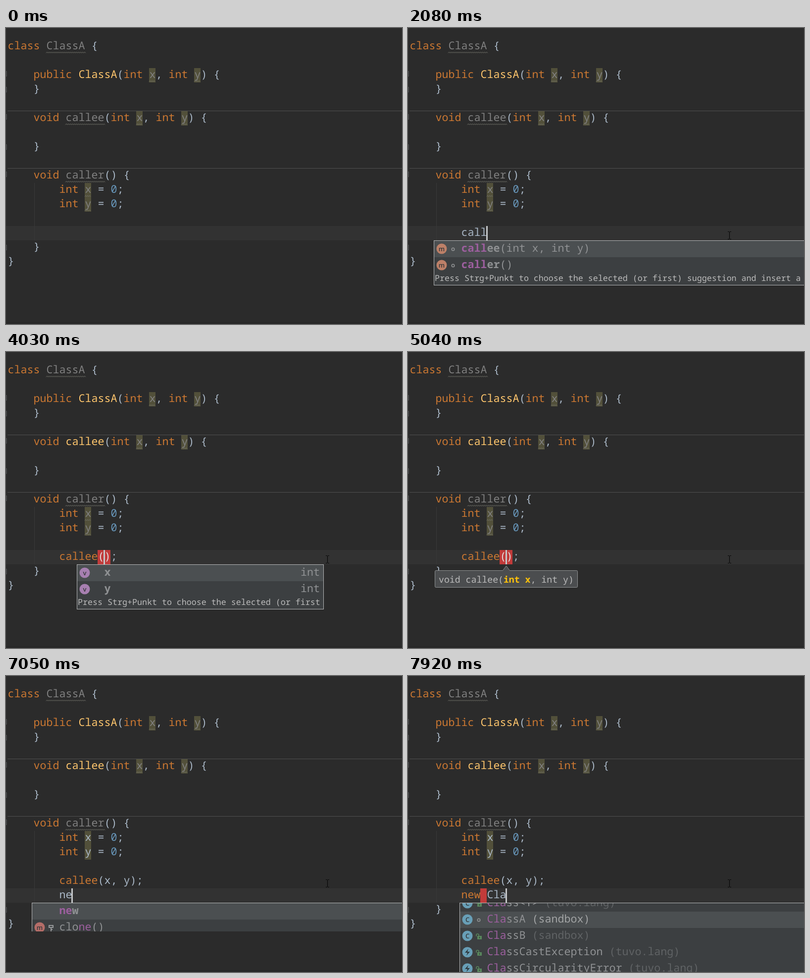
Recreate the animation shown at these times as an HTML page. Size 800 by 598 pixels, loop 8000 ms.

```html
<!DOCTYPE html>
<html lang="en">
<head>
<meta charset="utf-8">
<title>Code completion</title>
<style>
  html, body { margin: 0; width: 100%; height: 100%; overflow: hidden; background: #2b2b2b; }
  svg { display: block; }
  text {
    font-family: "Noto Sans Mono", "DejaVu Sans Mono", monospace;
    font-size: 21.667px;
    white-space: pre;
    text-rendering: geometricPrecision;
  }
  .icon { font: 600 13px "Open Sans", sans-serif; text-anchor: middle; }
</style>
</head>
<body>
<svg id="stage" width="800" height="598" viewBox="0 0 800 598"></svg>
<script>
const LOOP = 8000, CHAR = 13, ROW = 29, LEFT = 3, TOP = 23;
const RED = '#c13b3a', MATCH = '#3b514d', UNUSED = '#52503a';

// Style codes that prefix each run of text
const STYLES = {
  k: ['#cc7832'], t: ['#a9b7c6'], g: ['#808080'], f: ['#ffc66d'], n: ['#6897bb'],
  w: ['#e6dcdc'], m: ['#ffef28', 'bold'],
  P: ['#9d5f9f', 'bold'], B: ['#8f9193', 'bold'], p: ['#9d5f9f'], i: ['#909294'], d: ['#606365'],
  s: ['#a2a4a5'], h: ['#bbbbbb', 400], y: ['#ffc20a', 'bold']
};

let root = document.getElementById('stage');
const spans = [];

function el(tag, attrs, parent = root) {
  const node = document.createElementNS('http://www.w3.org/2000/svg', tag);
  for (const key in attrs) node.setAttribute(key, attrs[key]);
  return parent.appendChild(node);
}

function inside(node, draw) {
  const outer = root;
  root = node;
  draw();
  root = outer;
}

function during(from, to, draw) {
  const g = el('g', {});
  inside(g, draw);
  spans.push([g, from, to]);
}

const colX = col => LEFT + col * CHAR;
const rowY = row => TOP + row * ROW;
const rect = (x, y, width, height, fill) => el('rect', { x, y, width, height, fill });
const path = (d, stroke, width = 1, fill = 'none') =>
  el('path', { d, stroke, 'stroke-width': width, fill });

function write(x, y, runs, size) {
  const text = el('text', { x, y });
  if (size) text.style.fontSize = size + 'px';
  for (const run of runs.split('|')) {
    const [fill, weight = 500] = STYLES[run[0]];
    el('tspan', { fill, 'font-weight': weight }, text).textContent = run.slice(1);
  }
}

const code = (col, row, runs) => write(colX(col) + .5, rowY(row) + 20, runs);
const mark = (col, row, count, fill) => rect(colX(col), rowY(row), count * CHAR, ROW, fill);

function wave(col, row, count) {
  const steps = Math.round(count * CHAR / 4);
  path(`M${colX(col)} ${rowY(row) + 27.5}` + 'l2 -2l2 2'.repeat(steps), '#77786f');
}

function foldMark(row, closing) {
  const y = rowY(row) + (closing ? 9 : 6);
  path(`M0 ${y + .5}h1v10h-1`, '#5f6163');
}

function icon(x, y, kind) {
  const colors = { m: '#bd8068', r: '#b56d68', C: '#689fb7', z: '#689fb7', v: '#a77fb0' };
  el('circle', { cx: x, cy: y, r: 10.5, fill: colors[kind] });
  if (kind === 'z') {
    path(`M${x + 2} ${y - 7}l-7 8h5l-2 6l7 -8h-5z`, 'none', 0, '#2f3a40');
  } else {
    const label = el('text', { x, y: y + 4.5, class: 'icon', fill: '#36383a' });
    label.textContent = kind === 'r' ? 'm' : kind;
  }
}

function access(x, y, kind) {
  if (kind === 'o') {
    el('circle', { cx: x, cy: y, r: 2.7, fill: 'none', stroke: '#929495', 'stroke-width': 1.6 });
  } else if (kind === 'key') {
    path(`M${x - 4} ${y - 5}h8v4h-8zM${x} ${y - 1}v8M${x} ${y + 3}h3`, '#96989a', 2);
  } else if (kind === 'lock') {
    rect(x - 3, y - 1, 9, 7, '#59875d');
    path(`M${x - 5} ${y}v-3q0 -2 2.500 -2t2.500 2v2`, '#59875d', 1.6);
    path(`M${x + 1.500} ${y + 1}v3`, '#343b36', 1.4);
  }
}

// Each item: [icon, access, text runs, type at the right]
function popup(x, y, width, height, items, { sel = 0, scroll = 0, hint, cut } = {}) {
  const box = el('svg', { x, y, width, height });
  inside(box, () => {
    rect(0, 0, width, height, '#3c3f41');
    items.forEach(([kind, vis, runs, type], i) => {
      const top = 1 + 33 * i - scroll;
      if (i === sel) rect(0, top, width, 33, '#4b4f51');
      if (kind) icon(16, top + 16, kind);
      access(39, top + 17, vis);
      write(55.5, top + 22, runs);
      if (type) write(width - 8 - type.length * CHAR, top + 22, 'i' + type);
    });
    if (hint) {
      rect(0, 67, width, height, '#3c3f41');
      write(2, 82, 'h' + hint, 16.667);
    }
    el('rect', { x: .5, y: .5, width: width - 1, height: height - 1 + (cut ? 9 : 0),
      fill: 'none', stroke: '#b4b6b7' });
  });
}

function paramHint() {
  path('M54.500 443.500q0 -2 2 -2h135l7 -9.500l7 9.500h135q2 0 2 2v30q0 2 -2 2h-284q-2 0 -2 -2z',
    '#8f9293', 1, '#4b4d4f');
  write(62, 466, 'hvoid callee(|yint x|h, int y)', 18.2);
}

function bulb() {
  el('circle', { cx: 21, cy: 408, r: 7.7, fill: '#e8674d' });
  path('M17 413h8v3h-8z', 'none', 0, '#e8674d');
  path('M17 418h8M18 421h6', '#8b8e90', 1.8);
  path('M21 403v6M21 411v2.200', '#ffffff', 2.4);
}

// Editor background
rect(0, 594, 800, 4, '#282828');
during(0, 6360, () => mark(-1, 13, 63, '#323232'));
during(6360, LOOP, () => mark(-1, 14, 63, '#323232'));
for (const row of [5, 9]) rect(3, rowY(row) - 1, 797, 1, '#505050');
for (const [row, closing] of [[2], [3, 1], [5], [7, 1], [9]]) foldMark(row, closing);

for (const [col, row] of [[22, 2], [29, 2], [20, 5], [27, 5]]) {
  mark(col, row, 1, UNUSED);
  wave(col, row, 1);
}
for (const row of [10, 11]) mark(12, row, 1, UNUSED);

// Fixed code
code(0, 0, 'kclass |gClassA|t {');
wave(6, 0, 6);
code(4, 2, 'kpublic |fClassA|t(|kint |gx|t, |kint |gy|t) {');
code(4, 3, 't}');
code(4, 5, 'kvoid ');
code(15, 5, 't(|kint |gx|t, |kint |gy|t) {');
code(4, 7, 't}');
code(4, 9, 'kvoid |gcaller|t() {');
wave(9, 9, 6);

during(0, 2930, () => { code(9, 5, 'gcallee'); wave(9, 5, 6); });
during(2930, LOOP, () => code(9, 5, 'fcallee'));

['x', 'y'].forEach((name, i) => {
  const row = 10 + i;
  code(8, row, 'kint ');
  code(14, row, 't= |n0|t;');
  during(0, 5440, () => { code(12, row, 'g' + name); wave(12, row, 1); });
  during(5440, LOOP, () => code(12, row, 't' + name));
});

function closers(row) {
  code(4, row, 't}');
  code(0, row + 1, 't}');
  foldMark(row, true);
  rect(57, rowY(10), 1, rowY(row) - rowY(10), '#393939');
}
during(0, 6360, () => closers(14));
during(6360, LOOP, () => closers(15));

// Typing: [time, row, text, caret column, marks as [col, count, colour]]
const edits = [
  [680, 13, 't', 8],
  [1540, 13, 'tc', 9],
  [1860, 13, 'tca', 10],
  [2010, 13, 'tcal', 11],
  [2080, 13, 'tcall', 12],
  [2620, 13, 'tcallee|m()|t;', 15, [14, 2, MATCH]],
  [2930, 13, 'kcallee|w()|t;', 15, [14, 2, RED]],
  [5120, 13, 'kcallee|w(x, y|m)|t;', 19, [14, 5, RED], [19, 1, MATCH]],
  [5440, 13, 'kcallee|m(|tx, y|m)|t;', 19, [14, 1, MATCH], [19, 1, MATCH]],
  [5990, 13, 'kcallee|t(x, y);', 21],
  [6360, 14, 't', 8],
  [6910, 14, 'tn', 9],
  [7050, 14, 'tne', 10],
  [7140, 14, 'knew', 11],
  [7280, 14, 'knew ', 12],
  [7600, 14, 'knew |tC', 13, [11, 1, RED]],
  [7680, 14, 'knew |tCl', 14, [11, 1, RED]],
  [7760, 14, 'knew |tCla', 15, [11, 1, RED]]
];
edits.forEach(([from, row, runs, caret, ...marks], i) => {
  const to = i + 1 < edits.length ? edits[i + 1][0] : LOOP;
  during(from, to, () => {
    for (const [col, count, fill] of marks) mark(col, row, count, fill);
    code(8, row, runs);
    rect(colX(caret) - 1, rowY(row), 3, ROW, '#c4c6c8');
  });
});
during(6360, LOOP, () => code(8, 13, 'kcallee|t(x, y);'));

// Popups
const dotHint = 'Press Strg+Punkt to choose the selected (or first) suggestion and insert a dot afterwards';
const methods = n => [
  ['m', 'o', `P${'call'.slice(0, n)}|B${'callee'.slice(n)}|i(int x, int y)`],
  ['m', 'o', `P${'call'.slice(0, n)}|B${'caller'.slice(n)}|i()`]
];
during(1690, 1860, () => popup(52, 429, 900, 200, [
  ...methods(1),
  ['r', 'key', 'pc|ilone()'],
  ['C', 'o', 'pC|ilassA|d (sandbox)'],
  ['C', 'o', 'pC|ilassB|d (sandbox)']
]));
[[1860, 2010, 2], [2010, 2080, 3], [2080, 2620, 4]].forEach(([from, to, n]) =>
  during(from, to, () => popup(52, 429, 900, 91, methods(n), { hint: dotHint })));

during(3490, 4030, bulb);
during(3640, 4030, paramHint);
const argHint = 'Press Strg+Punkt to choose the selected (or first';
during(4030, 4500, () => popup(143, 429, 499, 91,
  [['v', '', 'Bx', 'int'], ['v', '', 'By', 'int']], { hint: argHint }));
during(4500, 5040, () => popup(143, 429, 499, 91,
  [['v', '', 'Bx, y'], ['v', '', 'Bx', 'int']], { hint: argHint }));
during(5040, 5120, paramHint);

during(7050, 7140, () => popup(52, 458, 900, 58, [
  ['', '', 'Pne|Bw'],
  ['r', 'key', 'iclo|pne|i()']
], { cut: true }));

const classes = [
  ['C', 'lock', 'pCla|iss<T>|d (tuvo.lang)'],
  ['C', 'o', 'pCla|issA|s (sandbox)'],
  ['C', 'lock', 'pCla|issB|d (sandbox)'],
  ['z', 'lock', 'pCla|issCastException|d (tuvo.lang)'],
  ['z', 'lock', 'pCla|issCircularityError|d (tuvo.lang)']
];
during(7840, 7920, () => popup(104, 458, 900, 200, classes, { sel: 1 }));
during(7920, LOOP, () => popup(104, 458, 900, 200, classes, { sel: 1, scroll: 16 }));

// Mouse pointer: [time, x, y]
const pointer = [[70, 682, 592], [150, 670, 530], [220, 657, 455], [300, 651, 419], [680, 649, 419]];
pointer.forEach(([from, x, y], i) => {
  const to = i + 1 < pointer.length ? pointer[i + 1][0] : LOOP;
  during(from, to, () =>
    path(`M${x - 3} ${y - 7.5}h3m1 0h3M${x - 3} ${y + 7.5}h3m1 0h3M${x + .5} ${y - 7}v14`, '#080808', 1.2));
});

const start = performance.now();
function tick() {
  const time = (performance.now() - start) % LOOP;
  for (const [node, from, to] of spans) {
    node.style.display = time >= from && time < to ? '' : 'none';
  }
  requestAnimationFrame(tick);
}
tick();
</script>
</body>
</html>
```
